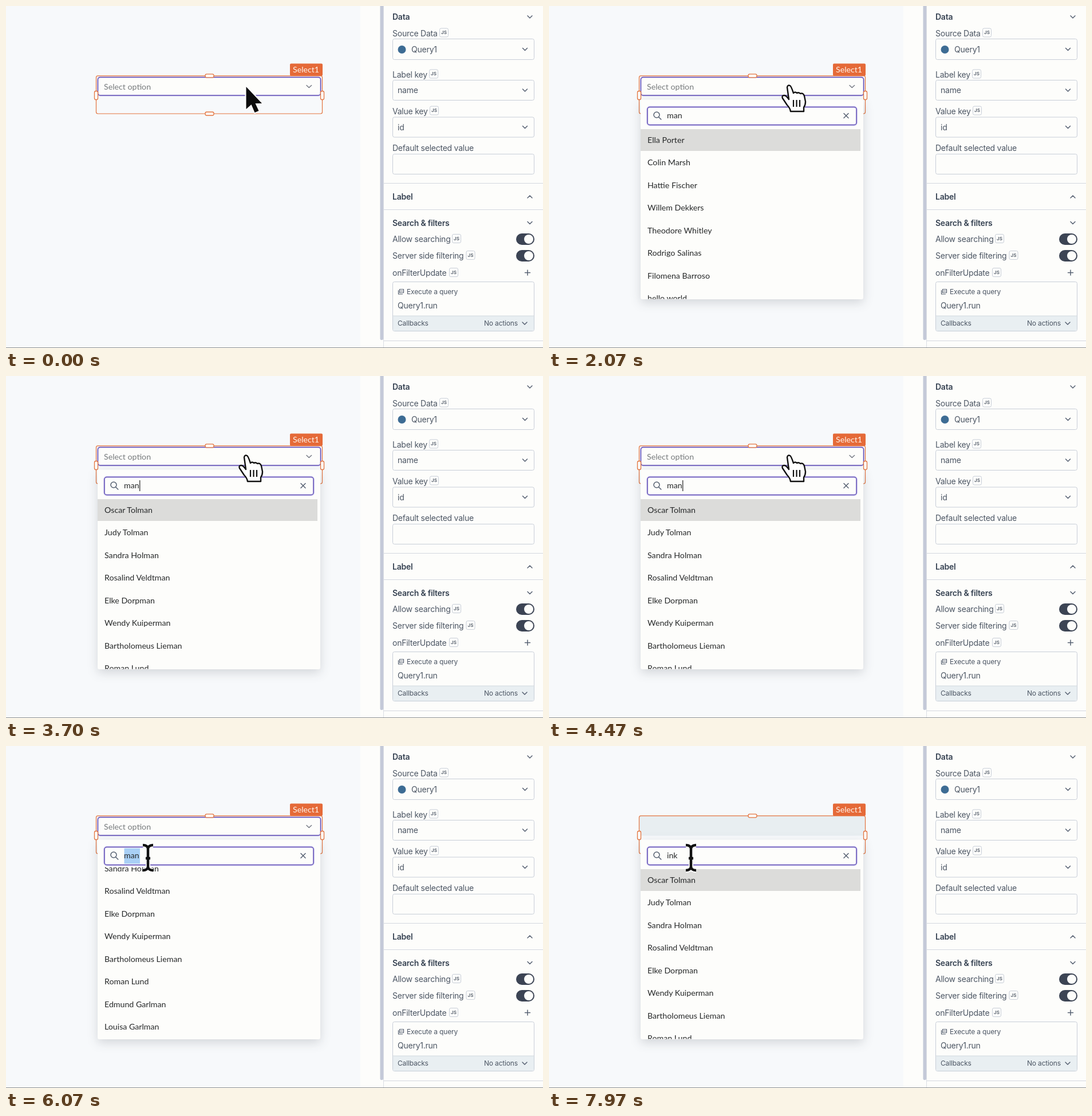
These frames come from a looping animation (938 by 597 pixels, 8 s). An HTML page:

```html
<!DOCTYPE html>
<html lang="en">
<head>
<meta charset="utf-8">
<title>Select with server side filtering</title>
<style>
  html, body { margin: 0; width: 100%; height: 100%; overflow: hidden; background: #fdfdfb; }
  svg { display: block; width: 100%; height: 100%; }
  text { white-space: pre; }
  .app { font: 14.2px Lato, sans-serif; }
  .panel { font: 14px Inter, sans-serif; letter-spacing: -.24px; fill: #4c5664; }
  .panel .head { font-weight: 600; fill: #364252; }
  .panel .small { font-size: 12px; letter-spacing: -.17px; }
  .panel .badge { font-size: 8px; font-weight: 600; letter-spacing: 0; }
  .line { fill: none; stroke: #566071; stroke-width: 1.5; stroke-linecap: round; stroke-linejoin: round; }
  .field { fill: #fdfdfb; stroke: #c8ced8; }
  .orange { fill: none; stroke: #e3743f; stroke-width: 1.2; }
  .grip { fill: #fdfdfb; stroke: #e3743f; stroke-width: 1.3; }
  .focus { fill: #fdfdfb; stroke: #5b48b4; stroke-width: 1.5; }
  .ring { fill: none; stroke: #d9d5f3; stroke-width: 4; }
  #menu { filter: drop-shadow(0 6px 9px rgba(30, 40, 50, .16)); }
</style>
</head>
<body>
<svg id="stage" viewBox="0 0 938 597"></svg>
<script>
const LOOP = 8000, ROW = 39.5, FIRST_ROW = 233.5, MAX_SCROLL = 99;
const ALL = ['Ella Porter', 'Colin Marsh', 'Hattie Fischer', 'Willem Dekkers', 'Theodore Whitley',
  'Rodrigo Salinas', 'Filomena Barroso', 'hello world'];
const MATCHES = ['Oscar Tolman', 'Judy Tolman', 'Sandra Holman', 'Rosalind Veldtman', 'Elke Dorpman',
  'Wendy Kuiperman', 'Bartholomeus Lieman', 'Roman Lund', 'Edmund Garlman', 'Louisa Garlman'];

const rect = (x, y, w, h, attrs = '', r = 0) =>
  `<rect x="${x}" y="${y}" width="${w}" height="${h}" rx="${r}" ${attrs}/>`;
const path = (d, attrs = 'class="line"') => `<path d="${d}" ${attrs}/>`;
// Text is placed by the vertical centre of its capitals.
const label = (x, cy, str, attrs = '', size = 14) =>
  `<text x="${x}" y="${cy + size * .36}" ${attrs}>${str}</text>`;
const chevron = (x, y, up = 1) => path(`M${x - 4} ${y - 2 * up}l4 ${4 * up}l4 ${-4 * up}`);
const group = (id, body, attrs = '') => `<g id="${id}" ${attrs}>${body}</g>`;

const badge = (x, y) => rect(x - 7.5, y - 7.5, 15, 15, 'class="field"', 2.5) +
  label(x, y, 'JS', 'class="badge" text-anchor="middle"', 8);
const field = (y, h, str = '', x = 684) => rect(675.5, y + .5, 247, h, 'class="field"', 3) +
  (str && label(x, y + h / 2 + .5, str) + chevron(906.5, y + h / 2 + .5));
const toggle = y => rect(891, y - 10, 32, 20, 'fill="#3c4454"', 10) +
  `<circle cx="913" cy="${y}" r="8" fill="#fdfdfb"/>`;
const divider = y => rect(660, y, 278, 1, 'fill="#d3d7df"');

const panel = [
  rect(619, 0, 319, 597, 'fill="#fdfdfb"'),
  rect(653.5, -5, 5.5, 588, 'fill="#c4c9d8"', 2.5),
  rect(659, 0, 1, 597, 'fill="#dadee4"'),
  label(675, 19, 'Data', 'class="head"'), chevron(915, 19),
  label(675, 47.5, 'Source Data'), badge(765, 46.5), field(57, 36, 'Query1', 708),
  '<circle cx="691.5" cy="76" r="7" fill="#3d6c94"/>',
  label(675, 119.5, 'Label key'), badge(747, 118.5), field(129, 35, 'name'),
  label(675, 183.5, 'Value key'), badge(748, 182.5), field(193.5, 35, 'id'),
  label(675, 248, 'Default selected value'), field(258, 35),
  divider(309), label(675, 333, 'Label', 'class="head"'), chevron(915, 333, -1), divider(355),
  label(675, 378.5, 'Search &amp; filters', 'class="head"'), chevron(915, 378.5),
  label(675, 407, 'Allow searching'), badge(787, 406), toggle(407),
  label(675, 436, 'Server side filtering'), badge(811.5, 435), toggle(436),
  label(675, 466, 'onFilterUpdate'), badge(782, 465), path('M906.5 465.5h9M911 461v9'),
  rect(675.5, 481.5, 247, 86, 'class="field"', 3),
  rect(676, 541, 246, 26, 'fill="#e9eff2"', 2), rect(676, 540.5, 246, 1, 'fill="#d0d7de"'),
  path('M687.5 494.5h7v6h-7zM685.5 496.5v6.5h7M689 497.5h4', 'class="line" style="stroke-width:1.2"'),
  label(700, 499, 'Execute a query', 'class="small"', 12),
  label(684, 523, 'Query1.run'),
  label(684, 554, 'Callbacks', 'class="small"', 12),
  label(835, 554, 'No actions', 'class="small"', 12), chevron(906, 554),
  divider(584)
].join('');

const widget = [
  group('select', rect(160.5, 124.5, 389, 31.5, 'class="ring" opacity=".7"', 4) +
    rect(160.5, 124.5, 389, 31.5, 'class="focus"', 4) +
    label(171, 140.5, 'Select option', 'fill="#777b7d"') +
    path('M525 138.5l4.300 4l4.300 -4', 'class="line" style="stroke:#777b85"')),
  group('skeleton', rect(158, 122, 394, 34.500, 'fill="#e8eef1"', 3)),
  rect(157.5, 121.8, 395, 66.2, 'class="orange"', 3),
  rect(348, 118.800, 15, 6, 'class="grip"', 2.5), rect(348, 185, 15, 6, 'class="grip"', 2.5),
  rect(154.5, 148.5, 6, 15, 'class="grip"', 2.5), rect(549.5, 148.5, 6, 15, 'class="grip"', 2.5),
  rect(496, 100.500, 57, 21.5, 'fill="#e56a38"', 2), label(501, 111, 'Select1', 'fill="#fff4ec"')
].join('');

const rows = (id, names) => group(id,
  names.map((name, i) => label(172, FIRST_ROW + i * ROW, name, 'fill="#262829"')).join(''));

const menu = [
  rect(160, 163.5, 389, 348.5, 'fill="#fdfdfb"', 3),
  `<g clip-path="url(#listClip)">${group('list',
    rect(160, 215, 384, 38, 'fill="#dcdcda"') + rows('all', ALL) + rows('matches', MATCHES))}</g>`,
  rect(544, 289.5, 5, 221.5, 'id="scrollbar" fill="#c3cfd2"', 2.5),
  rect(172, 176.5, 365, 31, 'class="ring"', 4), rect(172, 176.5, 365, 31, 'class="focus"', 4),
  '<circle cx="188" cy="190" r="5" class="line"/>', path('M191.800 194l4 4'),
  rect(206.5, 178.5, 27.5, 27, 'id="selection" fill="#a9d0f6"'),
  label(206, 191, '', 'id="query"'),
  rect(0, 182, 1.2, 19, 'id="caret" fill="#222"'),
  path('M515 187.5l8 8m0 -8l-8 8', 'id="clear" class="line"')
].join('');

const arrowShape = 'M1.500 2V41L10.500 33L16.500 47L23.500 44L17.500 31H29Z';
const beamShape = 'M-9 -22Q-1 -22 0 -16V16Q-1 22 -9 22M9 -22Q1 -22 0 -16M0 16Q1 22 9 22M-4 1H4';
const cursors = [
  group('arrow', path(arrowShape, 'stroke="#fff" stroke-width="4" stroke-linejoin="round"')),
  group('hand', path('M-2 3Q-1 -2 3 0Q5 1 9 13Q12 10 15 13Q18 11 21 14Q26 12 28 18L30 28Q30 34 27 38V45H4' +
    'Q3 39 -2 34L-10 22Q-12 17 -7 17Q-4 17 1 24Z',
    'fill="#fff" stroke="#111" stroke-width="2.4" stroke-linejoin="round"') +
    path('M9 25v12M14.500 25v12M20 25v12', 'stroke="#111" stroke-width="2.2"')),
  group('beam', path(beamShape, 'fill="none" stroke="#fff" stroke-width="8"') +
    path(beamShape, 'fill="none" stroke="#111" stroke-width="4.500"'))
].join('');

document.getElementById('stage').innerHTML = `
  <clipPath id="listClip">${rect(160, 211.5, 389, 300)}</clipPath>
  ${rect(0, 0, 938, 597, 'fill="#f7f9fb"')}
  <g class="panel">${panel}</g>
  <g class="app">${widget}${group('menu', menu)}</g>
  ${rect(0, 596, 938, 1, 'fill="#8d9092"')}
  ${cursors}`;

const $ = id => document.getElementById(id);
const show = (id, on) => $(id).setAttribute('display', on ? 'inline' : 'none');
const move = (id, x, y) => $(id).setAttribute('transform', `translate(${x} ${y})`);
const between = (t, a, b) => t >= a && t < b;
const ease = (t, a, b) => {
  const p = Math.min(1, Math.max(0, (t - a) / (b - a)));
  return p * p * (3 - 2 * p);
};
const mix = (a, b, p) => a + (b - a) * p;

const KEYS = [[1000, 'm'], [1200, 'ma'], [1400, 'man'], [6850, 'i'], [7100, 'in'], [7400, 'ink']];

function draw(t) {
  const typed = KEYS.filter(([at]) => t >= at).pop();
  const query = $('query');
  query.textContent = typed ? typed[1] : 'Search...';
  query.setAttribute('fill', typed ? '#262829' : '#8a8f94');
  show('clear', typed);

  const selected = between(t, 5900, 6850);
  show('selection', selected);
  show('caret', !selected && between(t % 1000, 400, 900));
  $('caret').setAttribute('x', typed ? 206.5 + query.getComputedTextLength() : 206);

  const loading = between(t, 2250, 2600) || t >= 7750;
  show('skeleton', loading);
  show('select', !loading);
  show('menu', t >= 450);
  show('all', t < 2600);
  show('matches', t >= 2600);
  move('list', 0, t < 6850 ? -MAX_SCROLL * ease(t, 4720, 5040) : 0);
  $('scrollbar').setAttribute('y', mix(215, 289.5, ease(t, 4720, 5040)));
  $('scrollbar').setAttribute('opacity', between(t, 4720, 5900) ? 1 - ease(t, 5600, 5900) : 0);

  const down = ease(t, 4500, 4850), up = ease(t, 5300, 5800);
  const x = mix(mix(418, 367, down), 248, up);
  const y = mix(mix(139, 312, down), 195, up);
  const pointer = t < 150 || between(t, 4580, 5700) ? 'arrow' : t < 4580 ? 'hand' : 'beam';
  for (const id of ['arrow', 'hand', 'beam']) {
    show(id, id === pointer);
    move(id, x, y);
  }
}

$('arrow').insertAdjacentHTML('beforeend', path(arrowShape, 'fill="#0c0c0c"'));
const start = performance.now();
function tick() {
  draw((performance.now() - start) % LOOP);
  requestAnimationFrame(tick);
}
tick();
</script>
</body>
</html>
```
